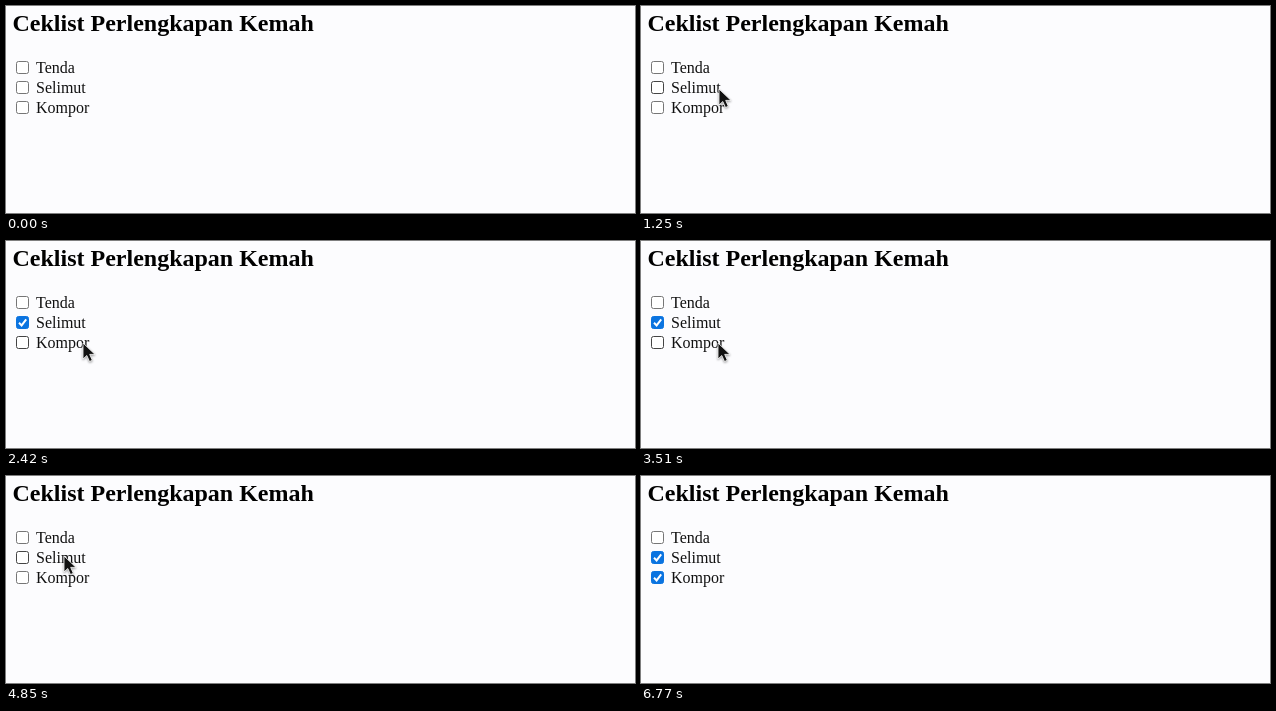
These frames come from a looping animation (629 by 207 pixels, 7680 ms). An HTML page:

```html
<!DOCTYPE html>
<html lang="id">
<head>
<meta charset="utf-8">
<title>Ceklist</title>
<style>
  html, body { margin: 0; width: 100%; height: 100%; overflow: hidden; background: #fcfcfe; }
  svg { display: block; font-family: "Liberation Serif", "Times New Roman", serif; }
  .title { font-size: 24px; font-weight: bold; }
  .row text { font-size: 16px; fill: #111; }
  .box { fill: #fff; stroke: #767676; }
  .tick { fill: none; stroke: #fff; stroke-width: 2; visibility: hidden; }
  .select { fill: #4a70ae; visibility: hidden; }
  .hover .box { stroke: #444; }
  .checked .box { fill: #0b74e0; stroke: #0b74e0; }
  .checked .tick, .selected .select { visibility: visible; }
  .row.selected text { fill: #e8eefa; }
  #cursor { filter: drop-shadow(0 1px 1px #0006); }
</style>
</head>
<body>
<svg width="629" height="207" viewBox="0 0 629 207">
  <text class="title" x="6.5" y="25">Ceklist Perlengkapan Kemah</text>
  <g id="list"></g>
  <path id="cursor" d="M0 0V16L3.8 12.5L6.5 18.5L9.3 17.3L6.7 11.4H12Z" fill="#111" stroke="#fff" stroke-width=".8"/>
</svg>
<script>
const LOOP = 7680, STEP = LOOP / 92;

// Pointer waypoints: time, x, y
const path = [
  [420, 112, 127], [900, 78, 83], [2000, 78, 83], [2330, 77, 102],
  [4090, 77, 102], [4350, 58, 103], [4510, 58, 103], [4760, 58, 80],
  [5340, 58, 80], [5680, 58, 99], [6160, 58, 99], [6680, 74, 210]
];

// Each click toggles the state; spans are on/off time pairs
const items = [
  { label: "Tenda", checked: [] },
  { label: "Selimut", checked: [[1660, 4780], [5100, LOOP]], selected: [[5010, 5920]] },
  { label: "Kompor", checked: [[2680, 3170], [5920, LOOP]] }
];

const list = document.getElementById("list");
const cursor = document.getElementById("cursor");

list.innerHTML = items.map(({ label }, i) => `
  <g class="row" transform="translate(0 ${i * 20})">
    <rect class="select" x="30" y="52" width="50" height="20"/>
    <rect class="box" x="10.5" y="55.5" width="12" height="12" rx="2"/>
    <path class="tick" d="M13 61.8L15.6 64.4L20.2 58.4"/>
    <text x="30" y="67">${label}</text>
  </g>`).join("");

const within = (spans = [], t) => spans.some(([from, to]) => t >= from && t < to);
const ease = k => k * k * (3 - 2 * k);

function pointer(t) {
  const i = path.findIndex(p => p[0] > t);
  if (i < 1) return null;
  const [t0, x0, y0] = path[i - 1], [t1, x1, y1] = path[i];
  const k = ease((t - t0) / (t1 - t0));
  return [x0 + (x1 - x0) * k, y0 + (y1 - y0) * k];
}

function draw(now) {
  const t = Math.floor((now % LOOP + 9) / STEP) * STEP % LOOP;
  const p = pointer(t);
  const hovered = p && p[0] < 85 ? Math.floor((p[1] - 52) / 20) : -1;
  cursor.style.display = p ? "" : "none";
  if (p) cursor.setAttribute("transform", `translate(${p})`);
  items.forEach((item, i) => {
    const state = list.children[i].classList;
    state.toggle("checked", within(item.checked, t));
    state.toggle("selected", within(item.selected, t));
    state.toggle("hover", hovered === i);
  });
}

const start = performance.now();
function frame() {
  draw(performance.now() - start);
  requestAnimationFrame(frame);
}
frame();
</script>
</body>
</html>
```
